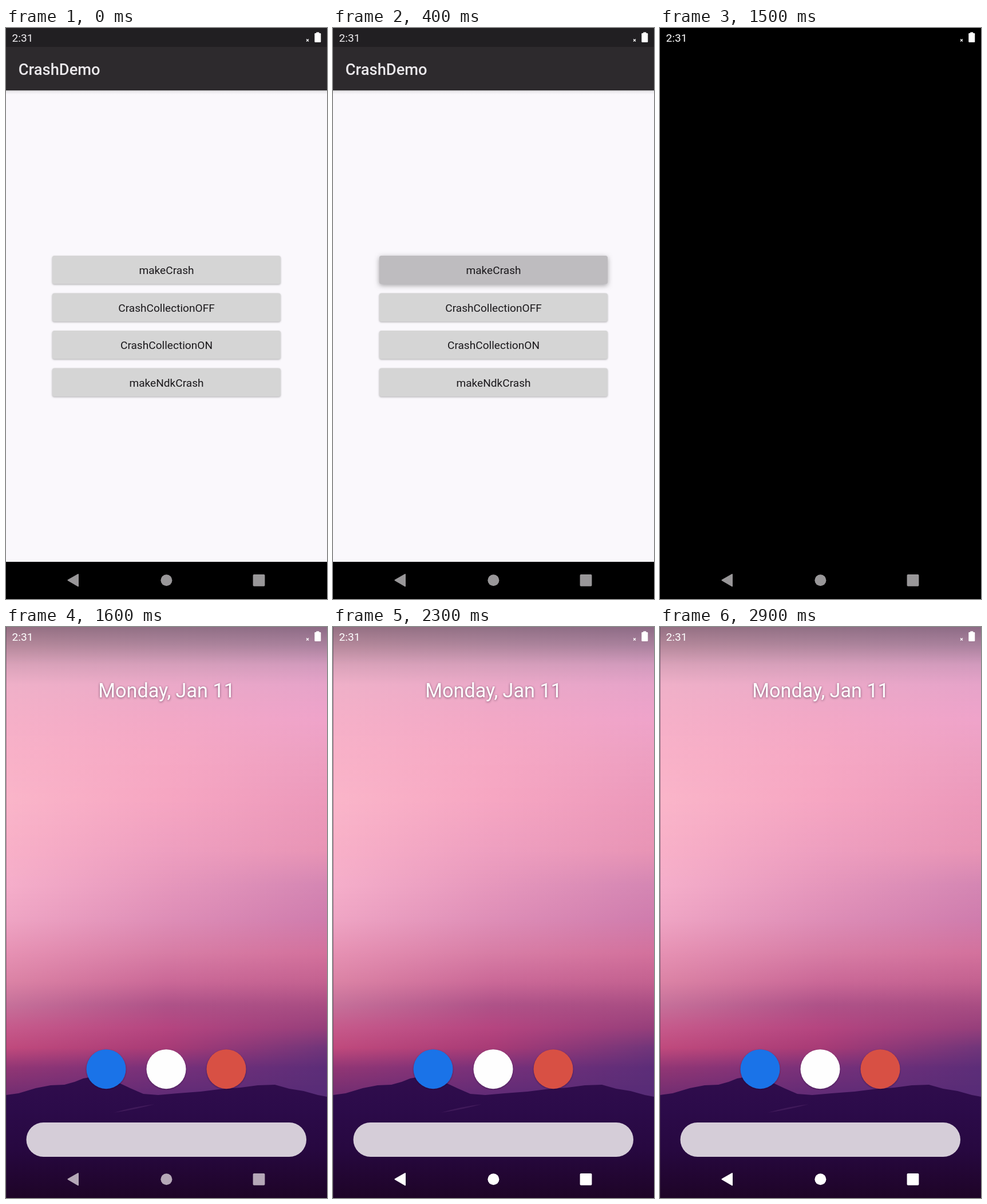
These frames come from a looping animation (561x998 px, 3000 ms). An HTML page with a canvas:

```html
<!DOCTYPE html>
<html lang="en">
<head>
<meta charset="utf-8">
<title>Crash demo</title>
<style>
html, body { margin: 0; width: 100%; height: 100%; overflow: hidden; background: #000; }
canvas { display: block; width: 561px; height: 998px; }
</style>
</head>
<body>
<canvas id="stage" width="561" height="998"></canvas>
<script>
const W = 561, H = 998, LOOP = 3000, STEP = 100;
const ctx = document.getElementById('stage').getContext('2d');
const clamp = v => Math.max(0, Math.min(1, v));
const mix = (a, b, k) => a.map((v, i) => v + (b[i] - v) * k);
const rgb = c => `rgb(${c.map(Math.round).join(',')})`;
const hex = s => [0, 2, 4].map(i => parseInt(s.substr(i, 2), 16));

function box(g, x, y, w, h, r, fill) {
  g.beginPath();
  g.roundRect(x, y, w, h, r);
  g.fillStyle = fill;
  g.fill();
}

function disc(g, x, y, r, fill) {
  g.beginPath();
  g.arc(x, y, r, 0, Math.PI * 2);
  g.fillStyle = fill;
  g.fill();
}

function shadow(g, color, blur, dy) {
  g.shadowColor = color;
  g.shadowBlur = blur;
  g.shadowOffsetY = dy;
}

function label(text, x, y, size, color, align = 'left', weight = 400) {
  ctx.font = `${weight} ${size}px Roboto, sans-serif`;
  ctx.textAlign = align;
  ctx.fillStyle = color;
  ctx.fillText(text, x, y);
}

// Sky colours by height: left, middle, right
const SKY = [
  [0, '957083 907085 8d6b86'],
  [30, 'b38799 ad849b a8809c'],
  [65, 'd9a2b9 d69fbb d29abd'],
  [100, 'efb0c8 eba9c8 e6a3c9'],
  [160, 'f5b0c8 f2a8c6 efa3ca'],
  [220, 'f8b1c8 f6a8c4 eda0c2'],
  [300, 'fab5c9 f6a6c2 ec99bb'],
  [390, 'f8b0c8 ee9fc0 e894b5'],
  [450, 'f5aeca e697bc d486b3'],
  [510, 'efa5c4 de8eb7 cf7cad'],
  [570, 'e691b3 d77da5 d3719c'],
  [620, 'db83a5 ca6897 c36190'],
  [660, 'c6719a ae5288 a94d83'],
  [700, 'c65a8b b54580 963f7b'],
  [735, 'c04a7d a83b76 70357a'],
  [770, '923674 77307a 5c2d78'],
  [830, '6a2b70 5b2a75 552c76']
];

const RIDGE = [
  [0, 818], [22, 815], [52, 806], [78, 801], [102, 800], [120, 795], [135, 789],
  [152, 786], [178, 790], [200, 798], [217, 806], [240, 816], [266, 818],
  [300, 815], [340, 812], [372, 808], [410, 805], [440, 801], [470, 800],
  [495, 807], [520, 811], [545, 818], [561, 821]
];

function paintWallpaper() {
  const c = document.createElement('canvas');
  c.width = W;
  c.height = H;
  const g = c.getContext('2d');
  const rows = SKY.map(([y, s]) => [y, s.split(' ').map(hex)]);
  for (let y = 0, i = 0; y < 830; y++) {
    while (y >= rows[i + 1][0]) i++;
    const [y0, a] = rows[i], [y1, b] = rows[i + 1];
    const k = (y - y0) / (y1 - y0);
    const line = g.createLinearGradient(0, 0, W, 0);
    a.forEach((col, n) => line.addColorStop(n / 2, rgb(mix(col, b[n], k))));
    g.fillStyle = line;
    g.fillRect(0, y, W, 1);
  }

  const land = g.createLinearGradient(0, 786, 0, H);
  land.addColorStop(0, '#300d4d');
  land.addColorStop(0.25, '#2c0b4a');
  land.addColorStop(0.6, '#270840');
  land.addColorStop(1, '#1e0427');
  g.beginPath();
  g.moveTo(0, H);
  RIDGE.forEach(p => g.lineTo(...p));
  g.lineTo(W, H);
  g.fillStyle = land;
  g.fill();

  g.beginPath();
  g.moveTo(188, 849);
  g.quadraticCurveTo(225, 838, 260, 834);
  g.quadraticCurveTo(228, 843, 188, 849);
  g.fillStyle = 'rgba(90,45,110,.45)';
  g.fill();

  g.fillStyle = 'rgba(70,50,75,.45)';
  g.fillRect(0, 0, 1, H);

  box(g, 35.5, 866, 489.5, 60, 30, '#d5cdd8');
  shadow(g, 'rgba(20,0,30,.4)', 3, 1);
  ['#1a73e8', '#fefefe', '#d85044'].forEach((col, i) => disc(g, 175 + i * 105, 772.7, 34.5, col));
  return c;
}

const wallpaper = paintWallpaper();

function drawStatus(color) {
  label('2:31', 10.6, 24, 19.1, color);
  box(ctx, 539.3, 9, 11, 16, 1.3, '#fff');
  ctx.fillRect(542.3, 7.4, 5, 2);
  ctx.strokeStyle = '#fff';
  ctx.lineWidth = 1.3;
  ctx.beginPath();
  ctx.moveTo(525, 19.5);
  ctx.lineTo(529, 23.5);
  ctx.moveTo(529, 19.5);
  ctx.lineTo(525, 23.5);
  ctx.stroke();
}

function drawNav(color) {
  ctx.fillStyle = ctx.strokeStyle = color;
  ctx.lineWidth = 2;
  ctx.lineJoin = 'round';
  ctx.beginPath();
  ctx.moveTo(108.5, 965.2);
  ctx.lineTo(126, 955);
  ctx.lineTo(126, 975.4);
  ctx.closePath();
  ctx.fill();
  ctx.stroke();
  disc(ctx, 280.4, 965.3, 10, color);
  box(ctx, 431.6, 955, 20.8, 20.8, 1.8, color);
}

function drawButton(text, y, press) {
  ctx.save();
  shadow(ctx, `rgba(0,0,0,${0.28 + 0.07 * press})`, 3 + 5 * press, 1.2 + 1.3 * press);
  box(ctx, 80.8, y, 399.2, 49.6, 4, rgb(mix([213, 213, 213], [190, 188, 191], press)));
  ctx.restore();
  label(text, 280.5, y + 32, 19.1, '#1b191c', 'center');
}

function drawApp(press) {
  ctx.fillStyle = '#faf8fc';
  ctx.fillRect(0, 0, W, 933);
  const edge = ctx.createLinearGradient(0, 109, 0, 116);
  edge.addColorStop(0, 'rgba(0,0,0,.2)');
  edge.addColorStop(0.35, 'rgba(0,0,0,.06)');
  edge.addColorStop(1, 'rgba(0,0,0,0)');
  ctx.fillStyle = edge;
  ctx.fillRect(0, 109, W, 7);
  ctx.fillStyle = '#2d2a2d';
  ctx.fillRect(0, 0, W, 109);
  ctx.fillStyle = '#211f22';
  ctx.fillRect(0, 0, W, 33);
  label('CrashDemo', 21.8, 81.6, 27.3, '#e9e7ea', 'left', 500);
  ['makeCrash', 'CrashCollectionOFF', 'CrashCollectionON', 'makeNdkCrash']
    .forEach((text, i) => drawButton(text, 398 + i * 65.5, i ? 0 : press));
}

function drawHome() {
  ctx.drawImage(wallpaper, 0, 0);
  ctx.save();
  shadow(ctx, 'rgba(50,20,50,.6)', 4, 1);
  label('Monday, Jan 11', 280.5, 122.6, 34.2, '#fff', 'center');
  ctx.restore();
}

function draw(ms) {
  const t = Math.floor(ms / STEP) * STEP;
  ctx.fillStyle = '#000';
  ctx.fillRect(0, 0, W, H);
  let nav = '#999799';
  if (t < 1500) {
    drawApp(clamp((t - 100) / 300));
  } else if (t >= 1600) {
    drawHome();
    nav = rgb(mix([181, 168, 183], [255, 255, 255], clamp((t - 1600) / 300)));
  }
  drawStatus(t < 1500 ? '#f0eef1' : '#fff');
  drawNav(nav);
}

const start = performance.now();
function tick() {
  draw((performance.now() - start) % LOOP);
  requestAnimationFrame(tick);
}
tick();
</script>
</body>
</html>
```
